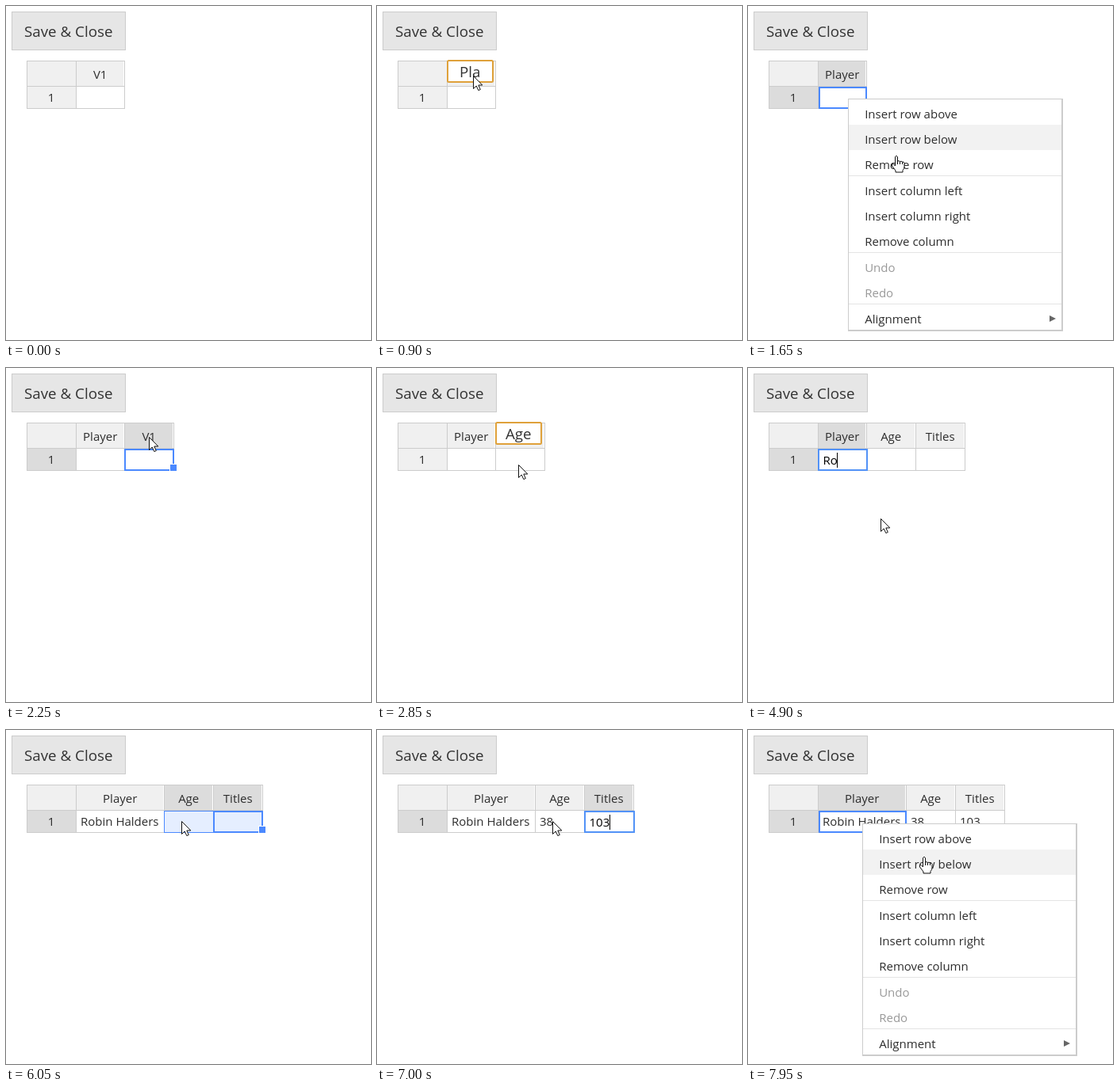
These frames come from a looping animation (460 px wide and 422 px high, 8000 ms). An HTML page:

```html
<!DOCTYPE html>
<html lang="en">
<head>
<meta charset="utf-8">
<title>Table editor</title>
<style>
  html, body { margin: 0; width: 100%; height: 100%; overflow: hidden; background: #fff; }
  svg { display: block; width: 460px; height: 422px; font: 15px "Open Sans", sans-serif; fill: #2d2d2d; }
  .big { font-size: 18.75px; fill: #333; }
</style>
</head>
<body>
<svg id="stage" viewBox="0 0 460 422"></svg>
<script>
const LOOP = 8000, STEP = 50;
const BLUE = '#4b89ff', LINE = '#ccc', HEAD = '#f0f0f0', ACTIVE = '#dcdcdc';
const LEFT = 26, FIRST = 88, TOP = 69, MID = 101, END = 129, ROW = 32;
const NAME = 'Robin Halders';
const MENU = [
  ['Insert row above', 'Insert row below', 'Remove row'],
  ['Insert column left', 'Insert column right', 'Remove column'],
  ['Undo', 'Redo'],
  ['Alignment']
];

const stage = document.getElementById('stage');
const pen = document.createElement('canvas').getContext('2d');
pen.font = '15px "Open Sans", sans-serif';
const textWidth = s => pen.measureText(s).width;

// The script below runs once and records state changes and pointer moves.
const events = [], moves = [];
let clock = 0, spot = [325, 277];

const wait = ms => { clock += ms; };
const set = change => events.push([clock, change]);
const commit = change => set({ head: null, cell: null, ...change });

function move(x, y, ms) {
  moves.push({ start: clock, ms, from: spot, to: [x, y] });
  spot = [x, y];
  wait(ms);
}

function type(field, word, step) {
  for (let n = 1; n <= word.length; n++) {
    wait(step);
    set({ [field]: word.slice(0, n) });
  }
}

// sel is [anchor column, focus column].
function rename(col, title) {
  set({ sel: [col, col] });
  wait(100);
  set({ sel: null, head: 'V1', at: col });
  wait(100);
  type('head', title, 60);
}

function insertColumn(cols, ms) {
  const [x, y] = spot;
  set({ menu: spot });
  wait(100);
  move(x + 122, y + 144, ms);
  wait(50);
  set({ menu: null, cols });
}

set({ cols: ['V1'], vals: [], sel: null, head: null, cell: null, menu: null });
wait(50);
move(121, 88, 400);
wait(50);
rename(0, 'Player');
move(126, 117, 150);
commit({ cols: ['Player'], sel: [0, 0] });
wait(40);
insertColumn(['Player', 'V1'], 600);

move(180, 87, 250);
rename(1, 'Age');
move(178, 122, 200);
wait(70);
commit({ cols: ['Player', 'Age'], sel: [1, 1] });
wait(150);
insertColumn(['Player', 'Age', 'V1'], 300);

move(246, 93, 300);
wait(100);
rename(2, 'Titles');
move(122, 115, 150);
commit({ cols: ['Player', 'Age', 'Titles'], sel: [0, 0] });
wait(40);
set({ cell: '' });
move(167, 190, 150);
type('cell', NAME, 45);
wait(200);
commit({ vals: [NAME] });

move(294, 116, 265);
set({ sel: [2, 2] });
move(221, 115, 150);
set({ sel: [2, 1] });
wait(250);
set({ sel: [1, 1] });
wait(200);
type('cell', '38', 100);
wait(50);
commit({ vals: [NAME, '38'], sel: [2, 2] });
type('cell', '103', 70);
wait(140);
commit({ vals: [NAME, '38', '103'] });

move(397, 140, 200);
move(144, 118, 350);
set({ sel: [0, 0] });
wait(100);
set({ menu: spot });
wait(50);
move(222, 160, 200);

const rect = (x, y, w, h, fill, more = '') =>
  `<rect x="${x}" y="${y}" width="${w}" height="${h}" fill="${fill}" ${more}/>`;
// A border of the given weight, lying inside the box from (x, y) to (r, b).
const border = (x, y, r, b, color, weight, fill = 'none', more = '') =>
  rect(x + weight / 2, y + weight / 2, r - x - weight, b - y - weight, fill,
    `stroke="${color}" stroke-width="${weight}" ${more}`);
const label = (x, y, s, more = '') =>
  `<text x="${x}" y="${y}" ${more}>${s.replace('&', '&amp;')}</text>`;
const centred = 'text-anchor="middle"';

const stateAt = t => Object.assign({}, ...events.filter(e => e[0] <= t).map(e => e[1]));

function pointerAt(t) {
  const m = moves.filter(m => m.start <= t).pop() || moves[0];
  const k = Math.min(1, Math.max(0, (t - m.start) / m.ms));
  const ease = k * k * (3 - 2 * k);
  return m.from.map((a, i) => a + (m.to[i] - a) * ease);
}

// Column lines; columns widen to fit their values.
function columnLines(s) {
  const xs = [FIRST];
  s.cols.forEach((_, i) =>
    xs.push(xs[i] + Math.max(i ? 62 : 61, Math.ceil(textWidth(s.vals[i] || '') + 12))));
  return xs;
}

function drawTable(s, xs) {
  const right = xs[s.cols.length];
  const lo = s.sel ? Math.min(...s.sel) : -1, hi = s.sel ? Math.max(...s.sel) : -1;
  let out = rect(LEFT + 1, TOP + 1, 61, 31, HEAD) +
    rect(LEFT + 1, MID + 1, 61, 27, s.sel ? ACTIVE : HEAD) +
    label(57, 121, '1', centred);
  s.cols.forEach((name, i) => {
    const l = xs[i], r = xs[i + 1];
    out += rect(l + 1, TOP + 1, r - l - 2, 31, i >= lo && i <= hi ? ACTIVE : HEAD) +
      label((l + r) / 2 + 0.2, 92, name, centred);
    if (s.vals[i]) out += label(l + 6, 121, s.vals[i]);
  });
  for (const y of [TOP, MID, END]) out += rect(LEFT, y, right - LEFT + 1, 1, LINE);
  for (const x of [LEFT, ...xs]) out += rect(x, TOP, 1, END - TOP + 1, LINE);
  return out;
}

function drawSelection(s, xs) {
  const lo = Math.min(...s.sel), hi = Math.max(...s.sel), a = s.sel[0];
  const l = xs[lo], r = xs[hi + 1];
  let out = '';
  if (hi > lo) {
    out += rect(l + 1, MID + 1, r - l - 1, 27, BLUE, 'fill-opacity=".14"') +
      border(l, MID + 1, r + 1, END + 1, BLUE, 1);
  }
  return out + border(xs[a] + (a ? 0 : 1), MID + 1, xs[a + 1] + 1, END + 1, BLUE, 2) +
    rect(r - 5, 121, 10, 9, '#fff') + rect(r - 4, 122, 8, 8, BLUE);
}

function drawCellEditor(s, xs) {
  const l = xs[s.sel[0]], w = textWidth(s.cell);
  const right = Math.max(xs[s.sel[0] + 1] + 2, l + Math.ceil(w) + 14);
  return border(l, MID + 1, right, END + 1, '#5292f7', 2, '#fff') +
    label(l + 6.5, 122, s.cell, 'fill="#000"') +
    rect(Math.floor(l + 6.5 + w), 107, 1, 19, '#000');
}

function drawHeadEditor(s, xs) {
  const x = xs[s.at];
  return border(x, 68, x + 59, 97, '#dfa13a', 2, '#fff', 'rx="1.5"') +
    `<clipPath id="field"><rect x="${x + 2}" y="70" width="55" height="24.5"/></clipPath>` +
    label(x + 29.3, 90, s.head, `class="big" ${centred} clip-path="url(#field)"`);
}

function drawMenu([x, y], [px, py]) {
  let out = rect(x, y, 271, 294, LINE) + rect(x + 1, y + 1, 268, 291, '#fff');
  let top = y + 1;
  MENU.forEach((group, g) => {
    if (g) out += rect(x + 1, top++, 268, 1, '#e4e4e4');
    for (const name of group) {
      const off = name === 'Undo' || name === 'Redo';
      if (!off && px > x + 1 && py >= top && py < top + ROW) out += rect(x + 1, top, 268, ROW, '#f2f2f2');
      out += label(x + 21.2, top + 24, name, off ? 'fill="#999"' : '');
      top += ROW;
    }
  });
  return out + `<path d="M${x + 254} ${y + 274}l8 4-8 4z" fill="#666"/>`;
}

function drawPointer([x, y], hand) {
  const shape = hand
    ? 'M-1.5 1.5Q0-1 1.5 1.5V7Q3 6 4.5 7.5Q6 6.5 7.5 8Q9.5 7.5 10 9.5V14Q10 17 8 18.5V21H-1V19L-5.5 13Q-6.5 10-4 10.5L-1.5 13ZM1.5 7V11M4.5 7.5V11M7.5 8V11'
    : 'M.5.5V16.5L4.2 13 6.8 18.6 9.3 17.5 6.8 12H11.8Z';
  return `<path transform="translate(${Math.round(x)} ${Math.round(y)})" d="${shape}" ` +
    'fill="#fff" stroke="#111" stroke-linejoin="round"/>';
}

function render(t) {
  const s = stateAt(t), xs = columnLines(s), pointer = pointerAt(t);
  let out = border(7, 7, 151, 56, LINE, 1, '#e6e6e6') +
    label(23, 39, 'Save & Close', 'class="big"') + drawTable(s, xs);
  if (s.cell !== null) out += drawCellEditor(s, xs);
  else if (s.sel) out += drawSelection(s, xs);
  if (s.head !== null) out += drawHeadEditor(s, xs);
  // The highlight trails the pointer by one step.
  if (s.menu) out += drawMenu(s.menu, pointerAt(t - STEP));
  if (t >= STEP) out += drawPointer(pointer, s.menu && pointer[0] > s.menu[0] + 1);
  stage.innerHTML = out;
}

let start = null, shown = 0;
function tick(now) {
  if (start === null) start = now;
  const t = Math.floor((now - start) % LOOP / STEP) * STEP;
  if (t !== shown) render(shown = t);
  requestAnimationFrame(tick);
}
render(0);
requestAnimationFrame(tick);
</script>
</body>
</html>
```
